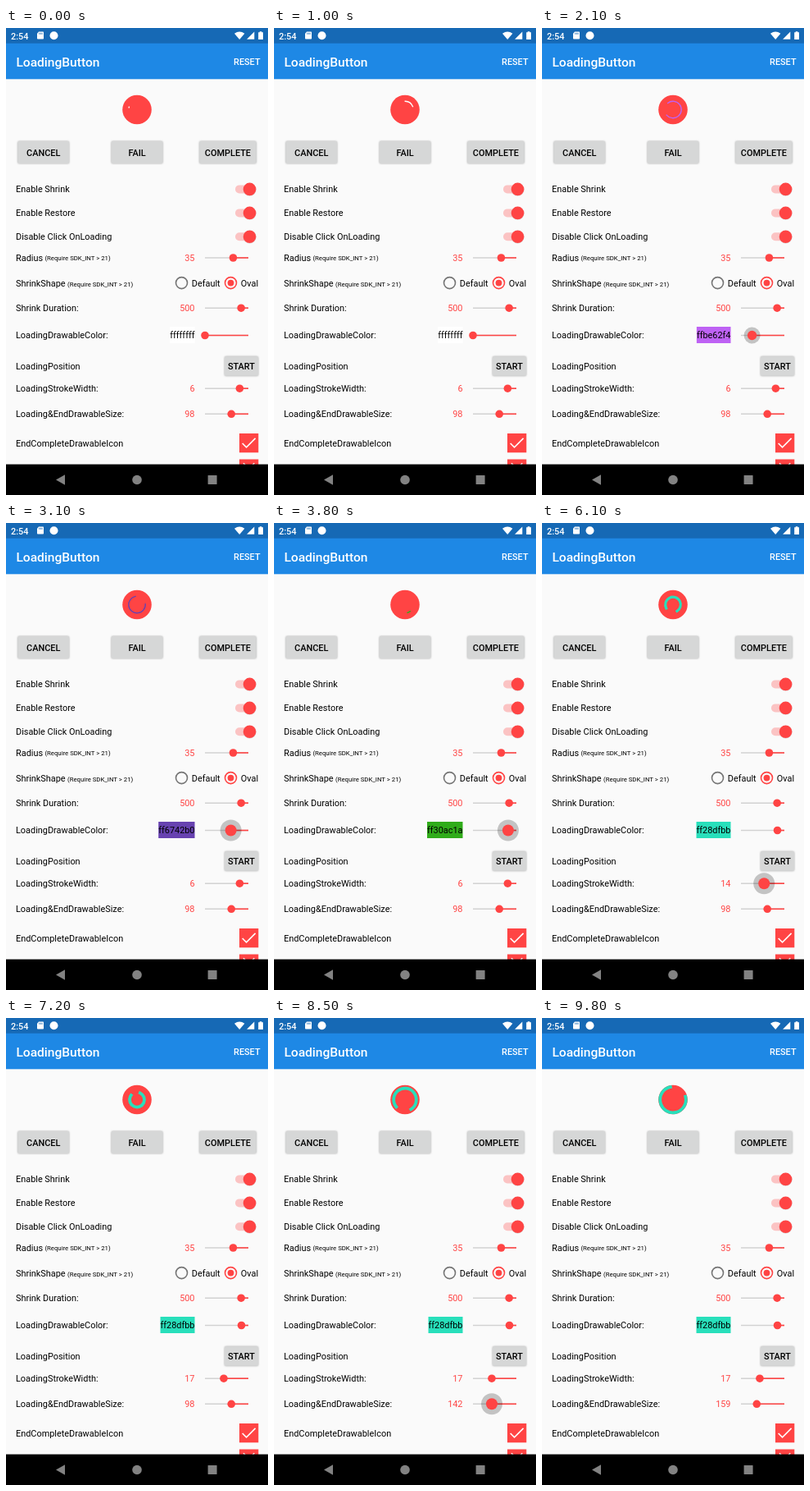
These frames come from a looping animation (320 by 569 pixels, 9.9 s). An HTML page:

```html
<!DOCTYPE html>
<html lang="en">
<head>
<meta charset="utf-8">
<title>LoadingButton</title>
<style>
  html, body { margin: 0; width: 100%; height: 100%; overflow: hidden; background: #fafafa; }
  svg { display: block; width: 100vw; height: 100vh; }
  text { font: 10.9px Roboto, sans-serif; fill: #000; white-space: pre; }
  .bold { font-weight: 500; }
  .mid { text-anchor: middle; }
  .end { text-anchor: end; }
  .small { font-size: 7.78px; }
  .title { font-size: 15.56px; }
  .white { fill: #fff; }
  .red { fill: #ff4444; }
  .line { stroke-width: 1.6; fill: none; }
  .key { fill: #d6d7d7; filter: drop-shadow(0 .8px .8px rgba(0, 0, 0, .35)); }
</style>
</head>
<body>
<svg viewBox="0 0 320 569">
  <rect width="320" height="569" fill="#fafafa"/>
  <rect width="320" height="62.3" fill="#1e88e5"/>
  <rect width="320" height="18.7" fill="#1669b5"/>
  <g class="white">
    <text class="white bold" x="6" y="13.5">2:54</text>
    <path d="M40 4.6h5.2q.8 0 .8.8v7.4q0 .8-.8.8h-6.4q-.8 0-.8-.8V6.8z"/>
    <g stroke="#1669b5"><path d="M40.7 5.8v2M42.4 5.8v2M44.1 5.8v2" stroke-width=".8"/></g>
    <circle cx="58.5" cy="9.3" r="5"/>
    <path d="M279 6.7q6.2-4.6 12.4 0L285.2 14z"/>
    <path d="M303.3 4.6v9.2h-9.2z"/>
    <path d="M308.2 5.3h1.6v-1h2.6v1h1.6v8.6h-5.8z"/>
  </g>
  <text class="title bold white" x="12.4" y="46.5">LoadingButton</text>
  <text class="bold white end" x="310.5" y="45">RESET</text>

  <circle class="red" cx="160" cy="99.5" r="17.8"/>
  <circle id="arc" cx="160" cy="99.5" fill="none" stroke-linecap="square" pathLength="360"/>

  <g id="panel"></g>

  <rect class="red" x="285" y="494" width="23.3" height="23.3"/>
  <path class="line" stroke="#fff" d="M288.7 506l4.9 4.9 11-11"/>
  <rect class="red" x="285" y="525.5" width="23.3" height="23.3"/>
  <path class="line" stroke="#fff" d="M290 530.3l13 13M303.3 530.3l-13 13"/>

  <rect y="531.6" width="320" height="37.4"/>
  <g fill="#828282">
    <path d="M72 544.2v12.6L61 550.5z"/>
    <circle cx="160" cy="550.5" r="5.8"/>
    <rect x="246.6" y="545" width="11" height="11" rx=".6"/>
  </g>
</svg>
<script>
const LOOP = 9900, STEP = 100, PX = 320 / 1440;
const RED = '#ff4444';
const panel = document.getElementById('panel');
const arc = document.getElementById('arc');

function set(node, attrs) {
  for (const k in attrs) node.setAttribute(k, attrs[k]);
}

function add(tag, attrs, content = '') {
  const node = document.createElementNS('http://www.w3.org/2000/svg', tag);
  set(node, attrs);
  node.textContent = content;
  panel.append(node);
  return node;
}

const label = (x, y, content, cls = '') => add('text', { x, y, class: cls }, content);

function key(x, y, width, height, content) {
  add('rect', { x, y, width, height, rx: 1.5, class: 'key' });
  label(x + width / 2, y + height / 2 + 4, content, 'bold mid');
}

function toggle(y, name) {
  label(12, y + 3.9, name);
  add('rect', { x: 280, y: y - 5, width: 24, height: 10, rx: 5, fill: RED, opacity: .3 });
  add('circle', { cx: 297.6, cy: y + .4, r: 8, fill: '#000', opacity: .12 });
  add('circle', { cx: 297.6, cy: y, r: 7.8, fill: RED });
}

function radio(x, name, on) {
  add('circle', { cx: x, cy: 310.6, r: 7, class: 'line', stroke: on ? RED : '#757575' });
  if (on) add('circle', { cx: x, cy: 310.6, r: 3.9, fill: RED });
  label(x + 12.3, 314.8, name);
}

// The sliders run from right to left.
function slider(y, max, name, isColor) {
  label(12, y + 3.9, name);
  const box = isColor && add('rect', { y: y - 10.5, height: 20 });
  const value = label(230.5, y + 3.9, '', isColor ? 'end' : 'end red');
  add('path', { d: `M243 ${y}H296`, class: 'line', stroke: '#d2d2d2' });
  const fill = add('path', { class: 'line', stroke: RED });
  const ripple = add('circle', { cy: y, fill: '#000' });
  const thumb = add('circle', { cy: y, fill: RED });

  return (v, press = 0, fade = 0) => {
    const x = 296 - 53 * v / max;
    const whole = Math.round(v);
    set(fill, { d: `M${x} ${y}H296` });
    set(thumb, { cx: x, r: 4.8 + 2.2 * press * (1 - fade) });
    set(ripple, { cx: x, r: press ? 8 + 5 * press : 0, opacity: .22 * (1 - fade) });
    value.textContent = isColor ? 'ff' + whole.toString(16).padStart(6, '0') : whole;
    if (isColor) {
      const width = value.getComputedTextLength();
      set(box, { x: 230.5 - width, width, fill: hex(v) });
    }
  };
}

const clamp = v => Math.min(1, Math.max(0, v));
const hex = v => '#' + Math.round(v).toString(16).padStart(6, '0');

// Linear interpolation through [time, value] pairs.
function track(t, keys) {
  let i = 1;
  while (i < keys.length - 1 && t > keys[i][0]) i++;
  const [t0, a] = keys[i - 1], [t1, b] = keys[i];
  return a + (b - a) * clamp((t - t0) / (t1 - t0));
}

// cubic-bezier(.4, 0, .2, 1)
function ease(x) {
  let lo = 0, hi = 1;
  for (let i = 0; i < 20; i++) {
    const m = (lo + hi) / 2, n = 1 - m;
    if (1.2 * n * n * m + .6 * n * m * m + m ** 3 < x) lo = m; else hi = m;
  }
  return 3 * lo * lo - 2 * lo ** 3;
}

key(14.5, 138, 62.5, 27, 'CANCEL');
key(128.8, 138, 62.5, 27, 'FAIL');
key(236.3, 138, 69.2, 27, 'COMPLETE');
toggle(196.4, 'Enable Shrink');
toggle(225.4, 'Enable Restore');
toggle(254.3, 'Disable Click OnLoading');
const radius = slider(280, 100, 'Radius');
label(47.4, 283, '(Require SDK_INT > 21)', 'small');
label(12, 314.8, 'ShrinkShape');
label(75, 314.8, '(Require SDK_INT > 21)', 'small');
radio(214.5, 'Default');
radio(274.5, 'Oval', true);
const duration = slider(341.2, 3000, 'Shrink Duration:');
const color = slider(374.5, 0xffffff, 'LoadingDrawableColor:', true);
label(12, 416, 'LoadingPosition');
key(267, 400.3, 41, 23.4, 'START');
const stroke = slider(439.2, 30, 'LoadingStrokeWidth:');
const size = slider(470.3, 250, 'Loading&EndDrawableSize:');
label(12, 509.8, 'EndCompleteDrawableIcon');
radius(35);
duration(500);

const colorKeys = [[2000, 0xffffff], [2100, 0xbe62f4], [3100, 0x6742b0], [3900, 0x28dfbb]];
const strokeKeys = [[5300, 6], [6100, 14], [6600, 17]];
const sizeKeys = [[8000, 98], [8700, 159]];

function drag(show, t, keys, down, up) {
  const v = track(t, keys);
  const live = t >= down && t < up + 300;
  show(v, live ? clamp((t - down) / 250) : 0, clamp((t - up) / 300));
  return v;
}

function spin(t, tint, width, diameter) {
  const turns = t / 1332, n = Math.floor(turns), p = turns - n;
  let from = 0, sweep;
  if (p < .5) {
    sweep = .79 * ease(p * 2) + .01;
  } else {
    sweep = .79 * (1 - ease(p * 2 - 1)) + .01;
    from = .79 - sweep;
  }
  const angle = 195 + 572.4 * n + 291.6 * p + 360 * from;
  set(arc, {
    r: (diameter - width) / 2 * PX,
    stroke: hex(tint),
    'stroke-width': width * PX,
    'stroke-dasharray': `${sweep * 360} 360`,
    transform: `rotate(${angle % 360} 160 99.5)`
  });
}

function draw(now) {
  const t = Math.floor(now % LOOP / STEP) * STEP;
  const tint = drag(color, t, colorKeys, 2000, 4100);
  const width = drag(stroke, t, strokeKeys, 5250, 6750);
  const diameter = drag(size, t, sizeKeys, 7950, 8750);
  spin(t, tint, width, diameter);
}

const start = performance.now();
function tick() {
  draw(performance.now() - start);
  requestAnimationFrame(tick);
}
tick();
</script>
</body>
</html>
```
